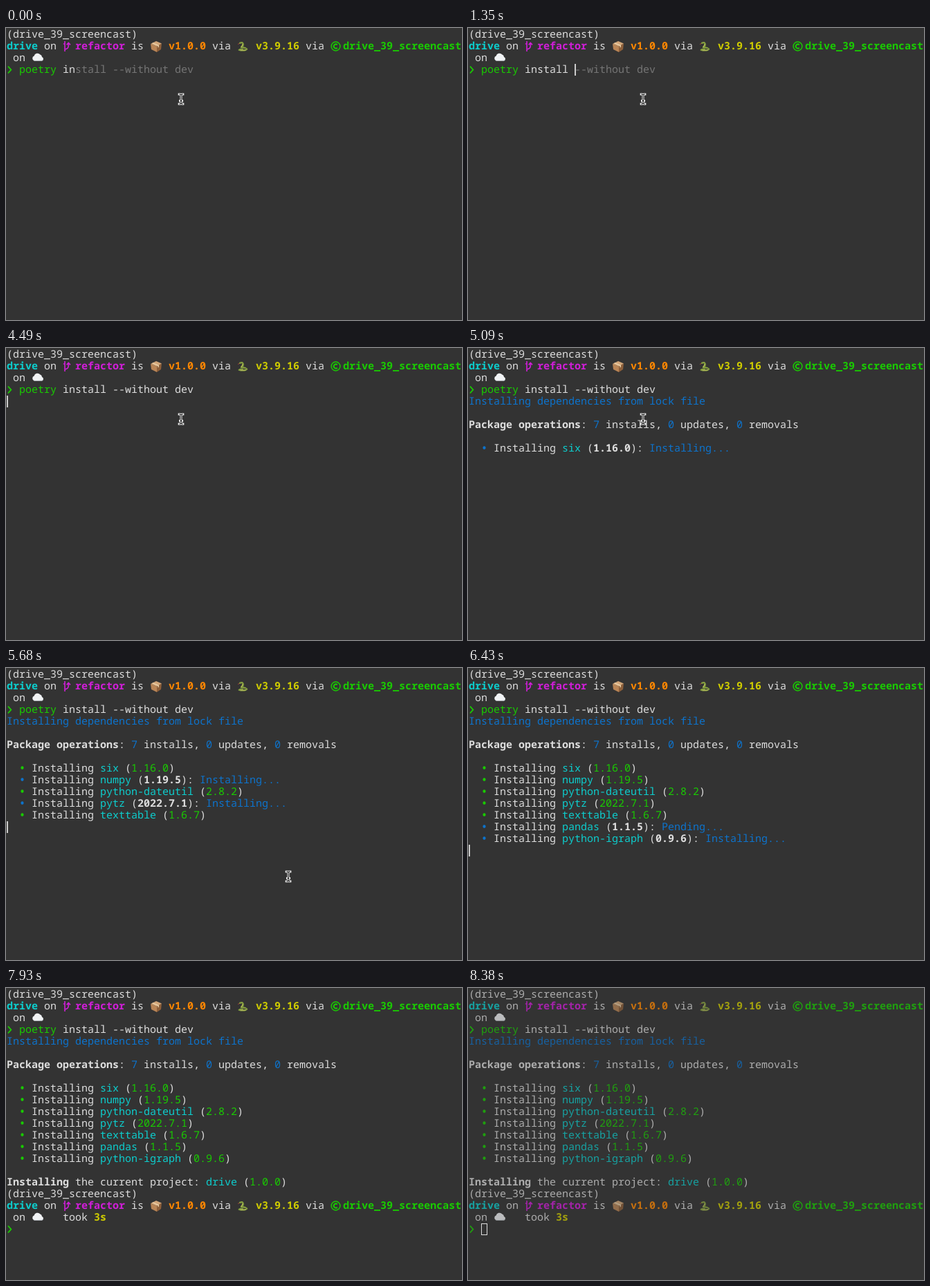
An HTML page for the animation above (8400 ms loop, 659 by 423 pixels).

```html
<!DOCTYPE html>
<html lang="en">
<head>
<meta charset="utf-8">
<title>Terminal: poetry install</title>
<style>
  html, body { margin: 0; width: 100%; height: 100%; overflow: hidden; background: #333; }
  svg { display: block; width: 100%; height: 100%; }
  text { font: 15px "Noto Sans Mono", "DejaVu Sans Mono", monospace; white-space: pre;
         text-rendering: geometricPrecision; fill: #ddd; }
  .b { font-weight: 700; }
  .cyan { fill: #0dcdcd; }
  .green { fill: #19cb00; }
  .blue { fill: #0d73cc; }
  .magenta { fill: #d01ed8; }
  .orange { fill: #ff8700; }
  .yellow { fill: #cecb00; }
  .hint { fill: #757575; }
</style>
</head>
<body>
<svg viewBox="0 0 659 423">
  <defs>
    <path id="branch" d="M3 1V16M3 13Q8.3 12 8.3 8V3.5M5.6 6.4L8.3 3.5L11 6.4M.8 5H3"
          fill="none" stroke="#d01ed8" stroke-width="1.6"/>
    <g id="box">
      <path d="M1 5L9 1L17 4.5L10 9Z" fill="#d2a679"/>
      <path d="M1 5L10 9V17L2 13Z" fill="#b98556"/>
      <path d="M10 9L17 4.5L16 13L10 17Z" fill="#8d5f3a"/>
      <path d="M4.5 3.2L13 7.1V9.6L11.6 10.4V8L3 4Z" fill="#ecd3ad"/>
    </g>
    <g id="snake" fill="none" stroke-linecap="round" stroke-linejoin="round">
      <path d="M4 3.8Q8 1.8 8.6 5T6 9.8Q9 10.5 11.5 10.8" stroke="#86a03f" stroke-width="2.3"/>
      <path d="M11.5 10.8Q17 12.5 12 14.2Q7 15.2 2.6 13.8Q4.5 12 8 12.8" stroke="#86a03f" stroke-width="1.9"/>
      <path d="M7.9 5.6Q7.2 8 5.8 9.6M5 14.2Q9 14.8 12.6 13.6" stroke="#d0cd6e" stroke-width=".9"/>
      <path d="M2.8 4.6L1.4 5.4" stroke="#c8473c" stroke-width=".8"/>
    </g>
    <g id="env" fill="none" stroke="#19cb00">
      <circle cx="7.5" cy="8.5" r="6.4" stroke-width="1.5"/>
      <path d="M9.8 6.3A3 3 0 1 0 9.8 10.7" stroke-width="2"/>
    </g>
    <g id="cloud" transform="translate(0 -1)">
      <path d="M4 13.5A3.6 3.6 0 0 1 3.6 6.6A5 5 0 0 1 12.4 4.6A3.6 3.6 0 0 1 15 8A2.9 2.9 0 0 1 15 13.5Z" fill="#f1f3f5"/>
      <path d="M2 12.4Q9 13.6 16.6 12.2Q16 13.5 15 13.5H4Q2.8 13.5 2 12.4Z" fill="#c9d2da"/>
    </g>
    <path id="arrow" d="M2 3.5L6.3 8.5L2 13.5" fill="none" stroke="#19cb00" stroke-width="1.9"/>
    <path id="beam" d="M-2.8-7H-1.2L0-6L1.2-7H2.8M0-6V6M-2.8 7H-1.2L0 6L1.2 7H2.8M-1.5 2.5H1.5" fill="none"/>
  </defs>
  <g id="screen"></g>
  <rect id="caret" width="2" height="17" fill="#ccc"/>
  <rect id="hollow" x="19.5" y="341.5" width="8" height="16" fill="none" stroke="#ddd"/>
  <g id="mouse">
    <use href="#beam" stroke="#f4f4f4" stroke-width="3" stroke-linecap="square"/>
    <use href="#beam" stroke="#111" stroke-width="1.1"/>
  </g>
</svg>
<script>
const LOOP = 8400, BLUR = 8380;
const $ = id => document.getElementById(id);
const screen = $('screen');
const xOf = col => 1 + 9 * col;
const yOf = row => 1 + 17 * row;
const items = [];

function make(tag, attrs, parent) {
  const el = document.createElementNS('http://www.w3.org/2000/svg', tag);
  for (const k in attrs) el.setAttribute(k, attrs[k]);
  parent.append(el);
  return el;
}

// Parts are [text, classes] pairs, shown while from <= t < to.
function line(row, col, parts, from = 0, to = LOOP) {
  const el = make('text', { x: xOf(col), y: yOf(row) + 13 }, screen);
  const spans = parts.map(([text, cls = '']) => {
    const span = make('tspan', { class: cls }, el);
    span.textContent = text;
    return span;
  });
  items.push({ el, from, to });
  return spans;
}

function icon(name, row, col, from) {
  const el = make('use', { href: '#' + name, x: xOf(col), y: yOf(row) }, screen);
  items.push({ el, from, to: LOOP });
}

function prompt(row, from) {
  line(row, 0, [['(drive_39_screencast)']], from);
  line(row + 1, 0, [['drive', 'b cyan'], [' on']], from);
  line(row + 1, 11, [['refactor', 'b magenta'], [' is']], from);
  line(row + 1, 26, [['v1.0.0', 'b orange'], [' via']], from);
  line(row + 1, 40, [['v3.9.16', 'b yellow'], [' via']], from);
  line(row + 1, 54, [['drive_39_screencast', 'b green']], from);
  line(row + 2, 1, [['on']], from);
  icon('branch', row + 1, 9, from);
  icon('box', row + 1, 23, from);
  icon('snake', row + 1, 37, from);
  icon('env', row + 1, 52, from);
  icon('cloud', row + 2, 4, from);
  icon('arrow', row + 3, 0, from);
}

// Each stage is [start, status]; the empty status means done.
function pkg(row, name, version, ...stages) {
  stages.forEach(([from, status], i) => {
    const to = stages[i + 1] ? stages[i + 1][0] : LOOP;
    line(row, 2, [
      ['•', status ? 'b blue' : 'b green'], [' Installing '], [name, 'cyan'], [' ('],
      [version, status ? 'b' : 'green'], [status ? '): ' : ')'], [status, 'blue']
    ], from, to);
  });
}

const WAIT = 'Pending...', BUSY = 'Installing...', DONE = '';
const command = 'install --without dev';

prompt(0, 0);
line(3, 2, [['poetry', 'green']]);
const [typed, hint] = line(3, 9, [[''], ['', 'hint']]);

line(4, 0, [['Installing dependencies from lock file', 'blue']], 5090);
line(6, 0, [['Package operations', 'b'], [': '], ['7', 'blue'], [' installs, '],
  ['0', 'blue'], [' updates, '], ['0', 'blue'], [' removals']], 5090);

pkg(8, 'six', '1.16.0', [5090, BUSY], [5380, DONE]);
pkg(9, 'numpy', '1.19.5', [5380, WAIT], [5530, BUSY], [6430, DONE]);
pkg(10, 'python-dateutil', '2.8.2', [5380, BUSY], [5680, DONE]);
pkg(11, 'pytz', '2022.7.1', [5380, BUSY], [6280, DONE]);
pkg(12, 'texttable', '1.6.7', [5380, WAIT], [5680, DONE]);
pkg(13, 'pandas', '1.1.5', [6430, WAIT], [6580, BUSY], [7030, DONE]);
pkg(14, 'python-igraph', '0.9.6', [6430, BUSY], [6580, DONE]);

line(16, 0, [['Installing', 'b'], [' the current project: '], ['drive', 'cyan'],
  [' ('], ['1.0.0', 'green'], [')']], 7180);
prompt(17, 7480);
line(19, 9, [['took '], ['3s', 'b yellow']], 7480);

const keys = [300, 450, 600, 750, 900, 1350, 1490, 1640, 1940, 2090, 2240,
  2390, 2390, 2540, 2690, 2690, 2990, 3140, 3290];

// Caret after the command is entered: [start, end, column, row].
const carets = [[3440, 4040, 0, 4], [4490, 4940, 0, 4], [5380, 5830, 0, 13],
  [6280, 6430, 0, 13], [6430, 7030, 0, 15], [7480, 7930, 2, 20]];

const path = [[0, 253, 103], [5380, 282, 150], [5530, 342, 233], [5680, 408, 302],
  [5830, 474, 350], [5980, 542, 384], [6130, 596, 405], [6280, 624, 416]];

const show = (el, on) => { el.style.display = on ? '' : 'none'; };

function draw(t) {
  for (const { el, from, to } of items) show(el, t >= from && t < to);

  const n = 2 + keys.filter(k => t >= k).length;
  typed.textContent = command.slice(0, n);
  hint.textContent = command.slice(n);

  const spot = t >= 300 && t < 3440
    ? [0, 0, 9 + n, 3]
    : carets.find(c => t >= c[0] && t < c[1]);
  show($('caret'), spot);
  if (spot) {
    $('caret').setAttribute('x', xOf(spot[2]));
    $('caret').setAttribute('y', yOf(spot[3]));
  }

  const [, x, y] = path.filter(p => t >= p[0]).pop();
  $('mouse').setAttribute('transform', `translate(${x} ${y})`);
  show($('mouse'), t < 6430);

  screen.setAttribute('opacity', t >= BLUR ? 0.72 : 1);
  show($('hollow'), t >= BLUR);
}

const start = performance.now();
let last = -1;
function tick() {
  const t = (performance.now() - start) % LOOP;
  if (t !== last) draw(last = t);
  requestAnimationFrame(tick);
}
tick();
</script>
</body>
</html>
```
